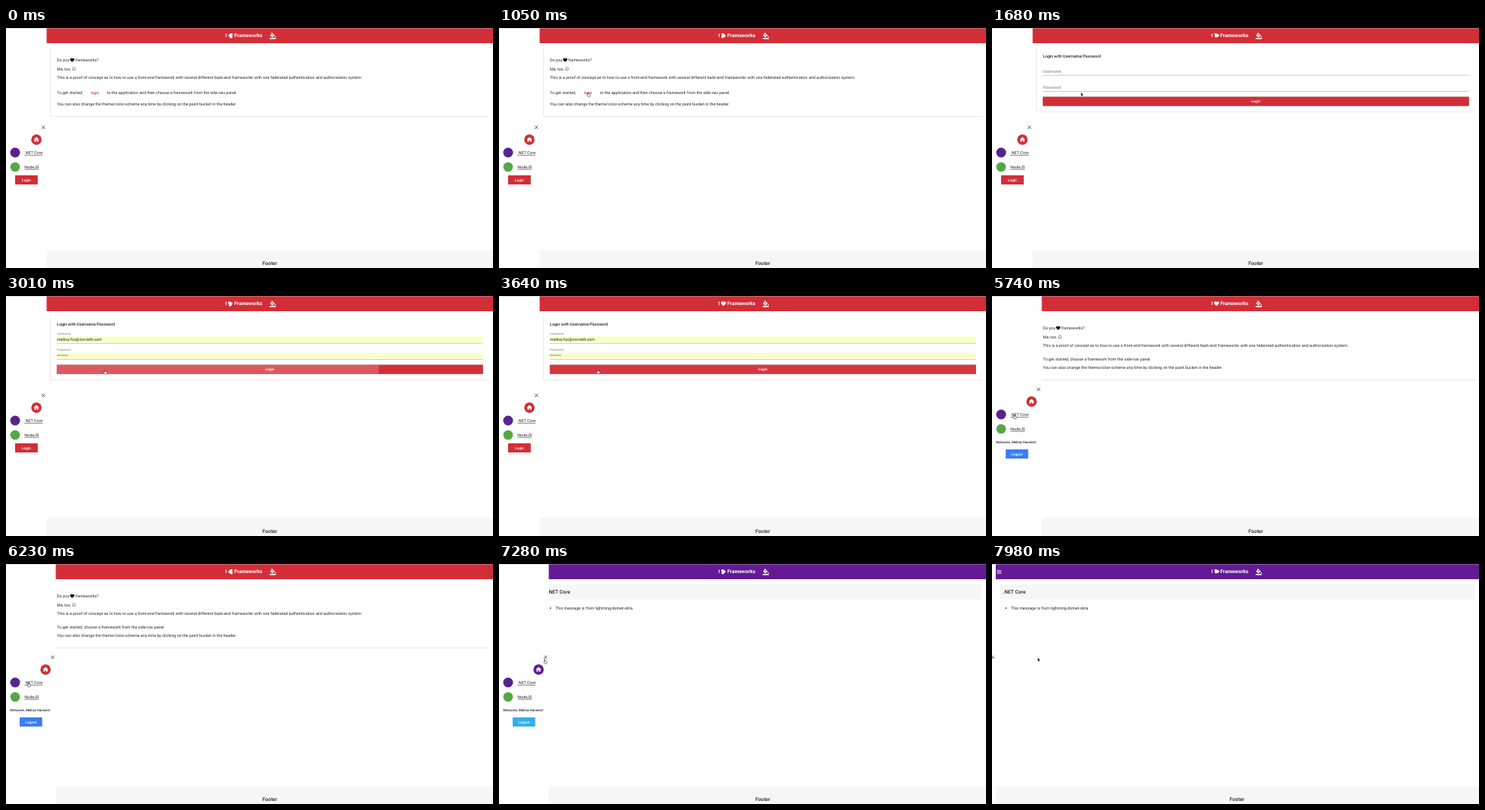
Write an HTML page that moves like this. It is 640x316 px and loops after 8000 ms.

```html
<!DOCTYPE html>
<html lang="en">
<head>
<meta charset="utf-8">
<title>I love frameworks</title>
<style>
  html, body { margin: 0; width: 100%; height: 100%; overflow: hidden; background: #fff; }
  svg { display: block; width: 100vw; height: 100vh; --main: #d22e37; --logout: #3b7cf4; }
  text { font: 5.33px Roboto, sans-serif; fill: #222; text-rendering: geometricPrecision; white-space: pre; }
  .title { font-size: 6.67px; font-weight: 500; }
  .bold { font-weight: 500; }
  .btn { font-size: 4.8px; font-weight: 500; text-anchor: middle; }
  .hint { fill: #777; }
  .small { font-size: 4px; }
  .white { fill: #fff; }
  .main { fill: var(--main); }
  .link { text-decoration: underline; text-decoration-thickness: .4px; }
  .line { fill: none; stroke: #222; stroke-width: .6; }
  .raised { filter: drop-shadow(0 .7px .6px rgba(0, 0, 0, .4)); }
</style>
</head>
<body>
<svg id="stage" viewBox="0 0 640 316">
  <defs>
    <path id="heart" d="M0 3C-1.2 1.9-3.3.4-3.3-1.2A1.75 1.75 0 0 1 0-1.9A1.75 1.75 0 0 1 3.3-1.2C3.3.4 1.2 1.9 0 3Z"/>
    <clipPath id="submitClip"><rect x="66.8" y="90.6" width="560" height="12"/></clipPath>
  </defs>

  <rect y="292.3" width="640" height="24" fill="#f6f6f6"/>
  <text id="footer" class="title" y="311.6" text-anchor="middle">Footer</text>
  <rect id="card" class="raised white"/>

  <g id="content">
    <g data-on="home welcome">
      <text x="67" y="44">Do you</text>
      <use href="#heart" transform="translate(87 42.2) scale(.85)"/>
      <text x="91" y="44">frameworks?</text>
      <text x="67" y="55.7">Me, too.</text>
      <g class="line" style="stroke-width:.4">
        <circle cx="89.3" cy="53.8" r="2.1"/>
        <path d="M88.1 54.4a1.3 1.3 0 0 0 2.4 0M88.5 52.8v.5M90.1 52.8v.5"/>
      </g>
      <text x="67" y="67.2">This is a proof of concept as to how to use a front-end framework with several different back-end frameworks with one federated authentication and authorization system.</text>
    </g>
    <g data-on="home">
      <text x="67" y="87.2">To get started,</text>
      <text x="117" y="87.1" class="btn main">login</text>
      <text x="132.8" y="87.2">to the application and then choose a framework from the side-nav panel.</text>
      <text x="67" y="101.8">You can also change the theme/color-scheme any time by clicking on the paint bucket in the header.</text>
    </g>
    <g data-on="welcome">
      <text x="67" y="84.6">To get started, choose a framework from the side-nav panel.</text>
      <text x="67" y="96.2">You can also change the theme/color-scheme any time by clicking on the paint bucket in the header.</text>
    </g>
    <g data-on="login">
      <text x="67" y="38.7" class="bold">Login with Username/Password</text>
      <g id="empty">
        <text x="67" y="58.7" class="hint">Username</text>
        <text x="67" y="80.2" class="hint">Password</text>
      </g>
      <g id="filled">
        <path d="M66.8 53.4h560v7.4h-560zM66.8 75.2h560v6.8h-560z" fill="#faffbd"/>
        <text x="67" y="50.5" class="hint small">Username</text>
        <text x="67" y="58.7">melina.fox@norvel4.com</text>
        <text x="67" y="72.3" class="hint small">Password</text>
        <text x="67" y="80.4">••••••••</text>
      </g>
      <path d="M66.8 62.3h560M66.8 83.5h560" stroke="#999" stroke-width=".5"/>
      <rect x="66.8" y="90.6" width="560" height="12" class="raised main"/>
      <g clip-path="url(#submitClip)"><circle id="ripple" cx="130" cy="97" class="white"/></g>
      <text x="346.7" y="98.3" class="btn white">Login</text>
    </g>
    <g data-on="message">
      <text x="74" y="59.9">This message is from lightning-dotnet-okta</text>
      <circle cx="67.6" cy="58.1" r=".9" fill="#222"/>
    </g>
  </g>
  <g data-on="message">
    <rect id="bar" y="27" height="19.4" fill="#f6f6f6"/>
    <text id="heading" y="38.5" class="title">.NET Core</text>
  </g>

  <rect width="640" height="20" class="main"/>
  <path d="M6.4 8.5h6M6.4 10.4h6M6.4 12.3h6" stroke="#fff" stroke-width=".8"/>
  <g class="white">
    <text x="288.2" y="12.2" class="title white" style="font-weight:700">I</text>
    <use id="spinner" href="#heart"/>
    <text x="300" y="12.2" class="title white" style="font-weight:700">Frameworks</text>
    <path d="M346.5 13h8v1.6h-8z"/>
    <path d="M348.6 6.3l.5-.5 4 4-2.7 2.5h-.7l-2.4-2.4v-.6l2-2zM350 8.2l-1.5 1.5h3z" fill-rule="evenodd"/>
    <path d="M353.8 10.3q1.5 2 0 2.2q-1.5-.2 0-2.2"/>
  </g>

  <g id="side">
    <rect id="panel" x="-10" height="316" class="white"/>
    <g id="tools">
      <path d="M47 128.6l4.4 4.4M51.4 128.6l-4.4 4.4" class="line" style="stroke-width:.7"/>
      <circle cx="40" cy="147" r="6.7" class="raised main"/>
      <path d="M40 143.6l3.6 3.3h-1v2.9h-1.9v-2h-1.4v2h-1.9v-2.9h-1z" class="white"/>
    </g>
    <g id="nav">
      <circle cx="12" cy="164" r="6.5" fill="#57248f"/>
      <text x="24.3" y="166" class="link">.NET Core</text>
      <circle cx="12" cy="183" r="6.3" fill="#55a846"/>
      <text x="24.3" y="184.9" class="link">NodeJS</text>
    </g>
    <g data-on="home login">
      <rect x="12" y="194" width="29.6" height="12" class="raised main"/>
      <text x="26.8" y="201.7" class="btn white">Login</text>
    </g>
    <g data-on="welcome message">
      <text x="5.3" y="193.6" class="bold" style="font-size:4.46px">Welcome, Melina Harwick!</text>
      <rect x="18" y="202" width="29.4" height="12" class="raised" style="fill:var(--logout)"/>
      <text x="32.7" y="209.8" class="btn white">Logout</text>
    </g>
  </g>
  <rect width="640" height=".7" fill="#bbb" opacity=".6"/>

  <g id="cursor" stroke-linejoin="round">
    <path id="arrow" d="M0 0V5.2L1.2 4.1 2 5.9 2.9 5.5 2.1 3.8H3.7Z" fill="#111" stroke="#fff" stroke-width=".4"/>
    <path id="hand" d="M-.4 0Q.2-.5.6 0V2L2.6 2.4Q3.2 2.6 3.1 3.4L2.6 5.5H.1L-1.4 3.4Q-1.4 2.6-.4 3.1Z" fill="#fff" stroke="#111" stroke-width=".5"/>
  </g>
</svg>

<script>
const LOOP = 8000, STEP = 70, SPIN = 2100;
const FILL = 2450, RIPPLE = 2838, CLOSE = 7780;

// start time, name, card top, card bottom
const scenes = [
  [0, 'home', 27, 116.3],
  [1260, 'login', 27, 110.3],
  [3780, 'welcome', 27, 110.5],
  [6400, 'message', 47, 69]
];

// time, x, y, hand shape
const moves = [
  [420, 165, 225, 0], [800, 117, 85, 1], [1260, 116.8, 84.6, 0],
  [1900, 116.8, 84.6, 0], [2200, 118, 57, 0], [2500, 118, 57, 0],
  [2730, 129.8, 97.5, 1], [3780, 129.5, 97, 0], [4450, 129.5, 97, 0],
  [5530, 29, 156.4, 1], [6650, 29, 156.4, 1], [7200, 60, 125.8, 1],
  [7700, 60, 125.8, 1], [7840, 60, 123.2, 0], [LOOP, 60, 123.2, 0]
];

const $ = id => document.getElementById(id);
const clamp = v => Math.min(1, Math.max(0, v));
const mix = (a, b, k) => a + (b - a) * k;
const show = (el, on) => el.style.display = on ? '' : 'none';
const shift = (el, x, y) => el.setAttribute('transform', `translate(${x} ${y})`);
const set = (el, attrs) => Object.entries(attrs).forEach(([k, v]) => el.setAttribute(k, v));

function bezier(x1, y1, x2, y2, x) {
  const at = (a, b, s) => 3 * (1 - s) ** 2 * s * a + 3 * (1 - s) * s * s * b + s ** 3;
  let lo = 0, hi = 1;
  for (let i = 0; i < 20; i++) {
    const s = (lo + hi) / 2;
    if (at(x1, x2, s) < x) lo = s; else hi = s;
  }
  return at(y1, y2, lo);
}

function drawCursor(t) {
  const i = moves.findLastIndex(m => m[0] <= t);
  show($('cursor'), i >= 0);
  if (i < 0) return;
  const a = moves[i], b = moves[i + 1];
  const k = clamp((t - a[0]) / (b[0] - a[0])), ease = k * k * (3 - 2 * k);
  shift($('cursor'), mix(a[1], b[1], ease), mix(a[2], b[2], ease));
  show($('hand'), a[3]);
  show($('arrow'), !a[3]);
}

function draw(t) {
  const [, scene, top, bottom] = scenes.findLast(s => s[0] <= t);
  document.querySelectorAll('[data-on]').forEach(g => show(g, g.dataset.on.split(' ').includes(scene)));

  const purple = scene === 'message', member = purple || scene === 'welcome';
  $('stage').style.setProperty('--main', purple ? '#631a94' : '#d22e37');
  $('stage').style.setProperty('--logout', purple ? '#31aeef' : '#3b7cf4');

  // The drawer slides out while the content margin shrinks.
  const closed = bezier(.25, .8, .25, 1, clamp((t - CLOSE) / 420));
  const margin = 53.3 * (1 - closed), left = margin + 5;
  set($('card'), { x: left, width: 635 - left, y: top, height: bottom - top });
  set($('bar'), { x: left + 1, width: 633 - left });
  set($('heading'), { x: margin + 10.3 });
  set($('footer'), { x: 320 + margin / 2 });
  shift($('content'), margin - 53.3, 0);

  set($('panel'), { width: member ? 75.4 : 63.4 });
  shift($('side'), -65.4 * closed, 0);
  shift($('tools'), member ? 12 : 0, member ? -8 : 0);
  shift($('nav'), 0, member ? -8 : 0);

  show($('filled'), t >= FILL);
  show($('empty'), t < FILL);
  const age = t - RIPPLE;
  set($('ripple'), {
    r: 500 * bezier(0, 0, .2, 1, clamp(age / 472)),
    opacity: .2 * (1 - clamp((age - 472) / 420))
  });

  set($('spinner'), { transform: `translate(295 10.1) rotate(${360 * (t - 5740) / SPIN})` });
  drawCursor(t);
}

function tick() {
  const t = performance.now() % LOOP;
  draw(Math.floor(t / STEP) * STEP);
  requestAnimationFrame(tick);
}
tick();
</script>
</body>
</html>
```
